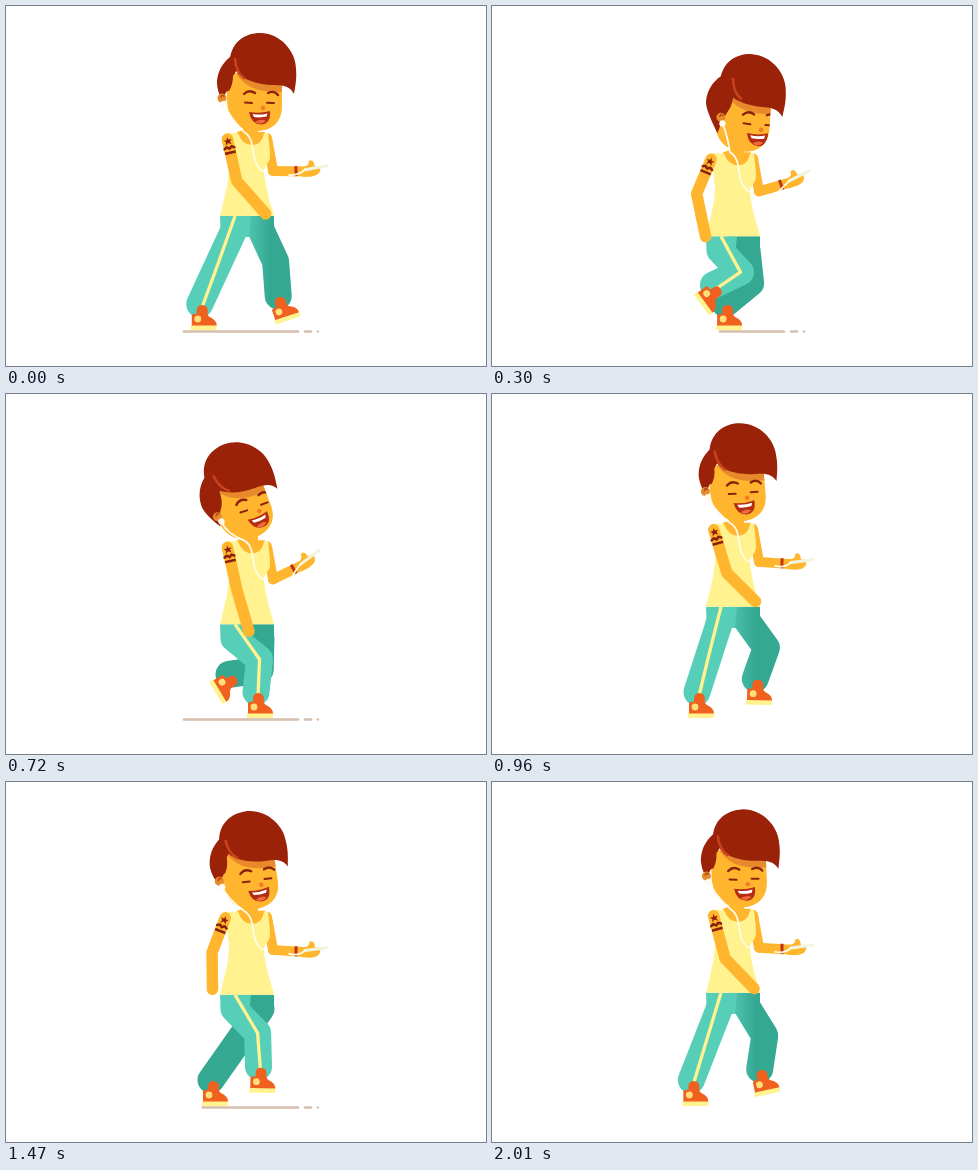
Animation, 480 px wide and 360 px high, one loop 2.04 s. Source, as an HTML page with a canvas:

```html
<!DOCTYPE html>
<html lang="en">
<head>
<meta charset="utf-8">
<title>Walking with music</title>
<style>
  html, body { margin: 0; width: 100%; height: 100%; overflow: hidden; background: #fff; }
  canvas { display: block; width: 480px; height: 360px; }
</style>
</head>
<body>
<canvas id="stage" width="480" height="360"></canvas>
<script>
const ctx = document.getElementById('stage').getContext('2d');
const CYCLE = 1020, STEP = 30;
const C = {
  skin: '#ffb62e', shade: '#e8892b', hair: '#992209', shine: '#c8421d', shirt: '#fff28f',
  light: '#56ceb8', dark: '#35a892', shoe: '#f0601f', ink: '#8c220c', ground: '#d6bfae'
};
const { PI, sin, cos, max, min, hypot, atan2 } = Math;

const rad = deg => deg * PI / 180;
const turns = t => 2 * PI * t / CYCLE;

function fill(d, color) {
  ctx.fillStyle = color;
  ctx.fill(new Path2D(d));
}
function stroke(d, color, width, cap = 'round') {
  ctx.strokeStyle = color;
  ctx.lineWidth = width;
  ctx.lineCap = cap;
  ctx.lineJoin = 'round';
  ctx.stroke(new Path2D(d));
}
function dot(x, y, r, color) {
  ctx.fillStyle = color;
  ctx.beginPath();
  ctx.arc(x, y, r, 0, 7);
  ctx.fill();
}
function placed(x, y, angle, draw) {
  ctx.save();
  ctx.translate(x, y);
  ctx.rotate(angle);
  draw();
  ctx.restore();
}

function ground(t) {
  if (t >= 870) return;
  const left = 177 + 52 * max(0, sin(turns(t)));
  for (const [a, b] of [[left, 293], [298, 306], [311, 313]]) {
    stroke(`M${a + 1},325.5 H${b - 1}`, C.ground, 2.6);
  }
}

// The foot glides back at constant speed, then lifts and swings forward
function footAt(time, depth) {
  const u = ((time - 20 + CYCLE) % CYCLE) / 540;
  if (u >= 1) return { x: 280 - 90 * (u - 1) * 540 / 480, y: 298, angle: 0 };
  const lift = sin(PI * u);
  return {
    x: 190 + 90 * u ** 1.6 + depth * lift,
    y: 298 - 19 * lift ** .7,
    angle: rad(60) * sin(PI * u / .8) * min(1, (1 - u) * 8)
  };
}

// The knee bends forward as the ankle comes closer to the hip
function kneeAt(hx, hy, ax, ay) {
  const dx = ax - hx, dy = ay - hy, d = hypot(dx, dy);
  const bend = .8 * Math.sqrt(max(0, 35 ** 2 - d * d / 4));
  return [(hx + ax) / 2 + bend * dy / d, (hy + ay) / 2 - bend * dx / d];
}

function shoe({ x, y, angle }) {
  placed(x + 2, y + 7, angle, () => {
    fill('M-11,14 H15 Q16,19 13,19 H-11 Z', C.shirt);
    fill('M-10,14.5 V4 Q-8,2 -5,3 V0 Q-5,-6 0,-6 Q6,-6 6,0 Q5,4 8,6 Q15,9 15,14.5 Z', C.shoe);
    dot(-4, 8, 3.4, '#ffe07a');
  });
}

function leg(hipX, waist, foot, color, stripe) {
  const hipY = waist + 14;
  const [kx, ky] = kneeAt(hipX, hipY, foot.x, foot.y);
  stroke(`M${hipX},${hipY} L${kx},${ky} L${foot.x},${foot.y}`, color, 27);
  if (stripe) stroke(`M${hipX + 1},${waist} L${kx},${ky} L${foot.x + 2},${foot.y + 4}`, C.shirt, 3.3, 'butt');
  shoe(foot);
}

function trousers(t, waist) {
  // The far leg blends into the near one while it reaches forward
  const blend = max(0, cos(turns(t))) ** 4;
  const color = ctx.createLinearGradient(236, 0, 264, 0);
  const mix = [[86, 53], [206, 168], [184, 146]].map(([a, b]) => Math.round(b + (a - b) * blend));
  color.addColorStop(0, `rgb(${mix})`);
  color.addColorStop(1, C.dark);
  fill(`M236,${waist} H268 V${waist + 16} L258,${waist + 21} H236 Z`, color);
  leg(255, waist, footAt(t + CYCLE / 2, 18), color, false);
  fill(`M214,${waist} H245 L243,${waist + 21} H230 L214.5,${waist + 13} Z`, C.light);
  leg(228, waist, footAt(t, 0), C.light, true);
}

function phoneArm(waist, lift) {
  const ey = waist - 45;
  stroke(`M261,${waist - 78} L267,${ey}`, C.skin, 10);
  placed(267, ey, lift, () => {
    stroke('M0,0 L37,2', C.skin, 10);
    fill('M29,-2 Q37,-4 36,-8 Q39,-11 41,-7 L42,-3 H47 Q49,6 38,7 H29 Z', C.skin);
    stroke('M32,0 L54,-3', '#f1f5df', 3);
    stroke('M23,-4 V6', '#c4300f', 3, 'butt');
  });
}

function torso(waist) {
  ctx.save();
  ctx.translate(0, waist);
  fill('M237,-96 H252 V-84 H259 V-66 H231 V-84 L237,-86 Z', C.skin);
  fill('M219,-83 H232 Q236,-71 246,-71 Q256,-71 258,-83 H262 C263,-72 264,-68 264,-60 '
    + 'C264,-53 258,-51 258,-45 C259,-28 265,-12 268,0 H214 C219,-20 223,-35 223,-50 Z', C.shirt);
  ctx.restore();
}

function swingArm(t, waist) {
  const swing = cos(turns(t + 90)), lead = cos(turns(t + 150));
  const sx = 220.5 + 1.5 * lead, sy = waist - 77;
  const ex = 220.5 + 17 * lead, ey = waist - 38 + 5 * lead;
  const hx = 235 + 29 * swing, hy = waist + 8 - 14 * swing ** 2;
  stroke(`M${sx},${sy} L${ex},${ey} L${hx},${hy}`, C.skin, 11.5);
  placed(sx, sy, atan2(ey - sy, ex - sx) - PI / 2, () => {
    fill('M0,-2 L1,1 4,1 2,3 3,6 0,4 -3,6 -2,3 -4,1 -1,1 Z', C.ink);
    stroke('M-5,9.5 L-2.5,8 0,10 2.5,8 5,9.5', C.ink, 2.6);
    stroke('M-5.5,14 H5.5', C.ink, 2.6, 'butt');
  });
}

function face(turn) {
  const outline = 'M-23,-58 H32 V-25 C32,-8 21,0 6,0 C-10,0 -22,-10 -23,-30 Z';
  fill(outline, C.skin);
  ctx.save();
  ctx.clip(new Path2D(outline));
  fill('M-16,-62 C-8,-44 8,-38 34,-39 V-52 Z', C.shade);
  ctx.translate(turn, 0);
  stroke('M-6,-37 Q-1,-42 5,-38 M18,-38 Q24,-41 28,-36', C.ink, 2.4);
  stroke('M-5,-28.5 L2,-28 M17,-28.2 L24,-28', C.ink, 2);
  dot(13, -23, 2.3, '#f5792a');
  ctx.translate(10, -19);
  fill('M-11,0 Q0,2 10,-1 Q11,12 1,12.5 Q-9,12 -11,0 Z', '#b42d13');
  fill('M-7.5,2 Q0,3.4 7.5,1.4 L6.5,4.6 Q0,6 -6,5 Z', '#fff');
  fill('M-5,10 Q1,6 6,9 Q1,14 -5,10 Z', '#f06a3a');
  ctx.restore();
}

function head(turn) {
  face(turn);
  const bx = -27 + .7 * turn, by = -30 + 1.2 * turn, fx = -17 + turn;
  fill(`M2,-84 C-24,-78 -33,-62 -33,-47 C-32,-38 ${bx - 3},${by - 5} ${bx},${by} `
    + `Q${bx + 3},${by - 12} ${fx - 4},-40 Q${fx},-46 ${fx},-55 Z`, C.hair);
  fill('M-20,-72 C-18,-90 -4,-98 10,-98 C30,-98 46,-80 46,-62 C47,-52 45,-43 44,-37 '
    + 'C41,-43 36,-46 24,-46 C6,-46 -12,-53 -16,-64 Z', C.hair);
  const s = turn * .7;
  stroke(`M${-15 + s},-72 Q${-14 + s},-59 ${-6 + s},-53`, C.shine, 2.6);
  dot(-28 + turn, -33, 4.5, C.shade);
  stroke(`M${-29 + turn},-34 q1,-3 3,-1`, '#b84b16', 1.6);
  dot(-26 + turn, -27, 3.2, '#fffbea');
}

function cord(waist, budX, budY, lift) {
  const px = 267 + 32 * cos(lift), py = waist - 45 + 32 * sin(lift);
  stroke(`M${budX},${budY} Q${budX + 5},${budY + 12} 238,${waist - 84} `
    + `C252,${waist - 76} 242,${waist - 54} 257,${waist - 45} `
    + `M283,${waist - 41} Q${px - 6},${py + 6} ${px},${py}`, '#fffdf0', 1.7);
}

function draw(time) {
  const t = time % CYCLE, s = sin(turns(t)), c = cos(turns(t));
  const waist = 221 - 11 * cos(2 * turns(t));
  const lift = rad(-14 + 15 * cos(2 * turns(t + 55)));
  const tilt = rad(-7 + 13 * s + 7 * c);
  const turn = 9 * s * s + 2.5 * s;
  const neckX = 244, neckY = waist - 85;
  const bx = -26 + turn, by = -27;

  ctx.fillStyle = '#fff';
  ctx.fillRect(0, 0, 480, 360);
  ground(t);
  trousers(t, waist);
  phoneArm(waist, lift);
  torso(waist);
  placed(neckX, neckY, tilt, () => head(turn));
  cord(waist, neckX + bx * cos(tilt) - by * sin(tilt), neckY + bx * sin(tilt) + by * cos(tilt), lift);
  swingArm(t, waist);
}

const start = performance.now();
function tick() {
  draw(Math.floor((performance.now() - start) / STEP) * STEP);
  requestAnimationFrame(tick);
}
tick();
</script>
</body>
</html>
```
